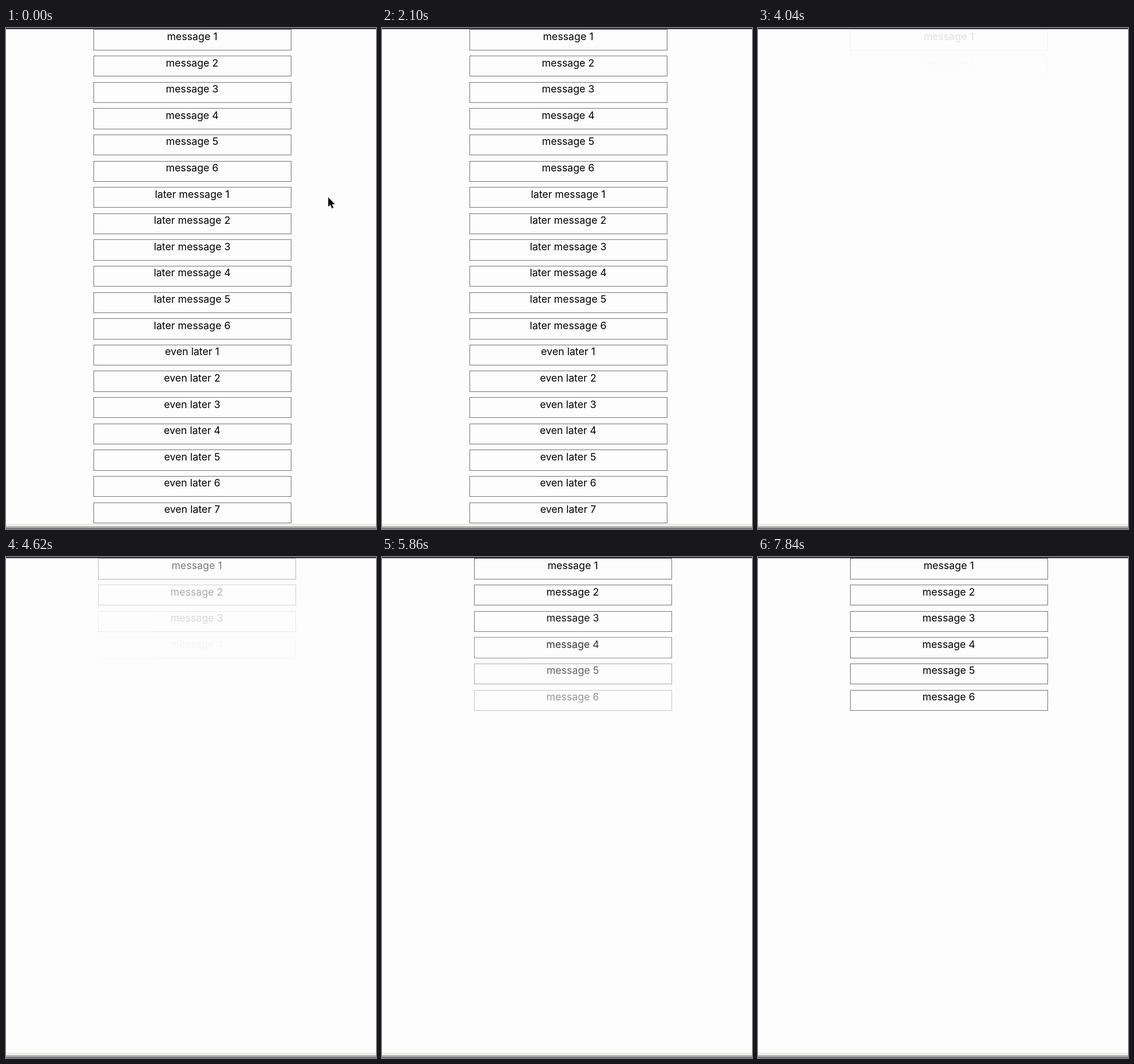
Animation, 643 px wide and 870 px high, one loop 8 s. Source, as an HTML page:

```html
<!DOCTYPE html>
<html lang="en">
<head>
<meta charset="utf-8">
<title>Messages</title>
<style>
  html, body { margin: 0; width: 100%; height: 100%; overflow: hidden; background: #fdfdfd; }
  svg { display: block; width: 643px; height: 870px; }
  text { font: 17.7px Inter, "Open Sans", sans-serif; text-anchor: middle; }
  .box { fill: none; stroke: #74747a; }
</style>
</head>
<body>
<svg viewBox="0 0 643 870">
  <rect width="643" height="870" fill="#fdfdfd"/>
  <g id="list"></g>
  <rect width="643" height="2" fill="#2b2b33"/>
  <rect y="861" width="643" height="1" fill="#e2e2dc"/>
  <rect y="862" width="643" height="3" fill="#f3f3ee"/>
  <rect y="865" width="643" height="3" fill="#b4b4b2"/>
  <rect y="868" width="643" height="2" fill="#77777a"/>
  <g id="cursor">
    <path d="M.5 1.5V18L4.2 14.6 6.8 20.6 9.6 19.4 7 13.5H12Z" fill="#000" opacity=".15"/>
    <path d="M0 0V16.3L3.7 12.8 6.3 19 9 17.9 6.4 11.8H11.4Z" stroke="#fff" stroke-width="1.2" paint-order="stroke"/>
  </g>
</svg>
<script>
const LOOP = 8000, RELOAD = 3500;
const FIRST_TOP = 2.4, PITCH = 45.62, BOX_HEIGHT = 36.3, BASELINE = 18.5;
const STAGGER = 0.135;

const list = document.getElementById('list');
const cursor = document.getElementById('cursor');

const numbered = (label, count) => Array.from({ length: count }, (_, i) => `${label} ${i + 1}`);
const labels = [
  ...numbered('message', 6),
  ...numbered('later message', 6),
  ...numbered('even later', 7)
];

function add(parent, tag, attrs) {
  const node = document.createElementNS('http://www.w3.org/2000/svg', tag);
  for (const name in attrs) node.setAttribute(name, attrs[name]);
  return parent.appendChild(node);
}

const rows = labels.map((label, i) => {
  const row = add(list, 'g');
  const y = FIRST_TOP + PITCH * i;
  const top = Math.round(y), bottom = Math.round(y + BOX_HEIGHT);
  add(row, 'rect', { class: 'box', x: 152.5, y: top + 0.5, width: 343, height: bottom - top - 1 });
  add(row, 'text', { x: 323.5, y: y + BASELINE }).textContent = label;
  return row;
});

const clamp = v => Math.min(1, Math.max(0, v));
const smooth = v => (v = clamp(v)) * v * (3 - 2 * v);

// Linear interpolation through [time, ...values] stops.
function track(stops, t, ease = v => v) {
  let i = 0;
  while (i < stops.length - 2 && t >= stops[i + 1][0]) i++;
  const [a, b] = [stops[i], stops[i + 1]];
  const k = ease(clamp((t - a[0]) / (b[0] - a[0])));
  return a.slice(1).map((v, j) => v + (b[j + 1] - v) * k);
}

const pointer = [[0, 560, 294], [1000, 74, 24], [1100, 74, 24], [1500, 40, -24]];
const fade = [
  [3670, 0], [4040, 0.2], [4220, 0.31], [4320, 0.33], [5060, 0.77], [5160, 0.78],
  [5860, 1.11], [7205, 1.68]
];

function draw(t) {
  const [x, y] = track(pointer, t, smooth);
  cursor.setAttribute('transform', `translate(${x} ${y})`);

  const reloaded = t >= RELOAD;
  const [progress] = track(fade, t);
  list.setAttribute('transform', `translate(${reloaded ? 8 : 0} 0)`);
  rows.forEach((row, i) => {
    const shown = i < 6 ? smooth(progress - i * STAGGER) : 0;
    row.setAttribute('opacity', reloaded ? shown : 1);
  });
}

const start = performance.now();
function tick() {
  draw((performance.now() - start) % LOOP);
  requestAnimationFrame(tick);
}
tick();
</script>
</body>
</html>
```
